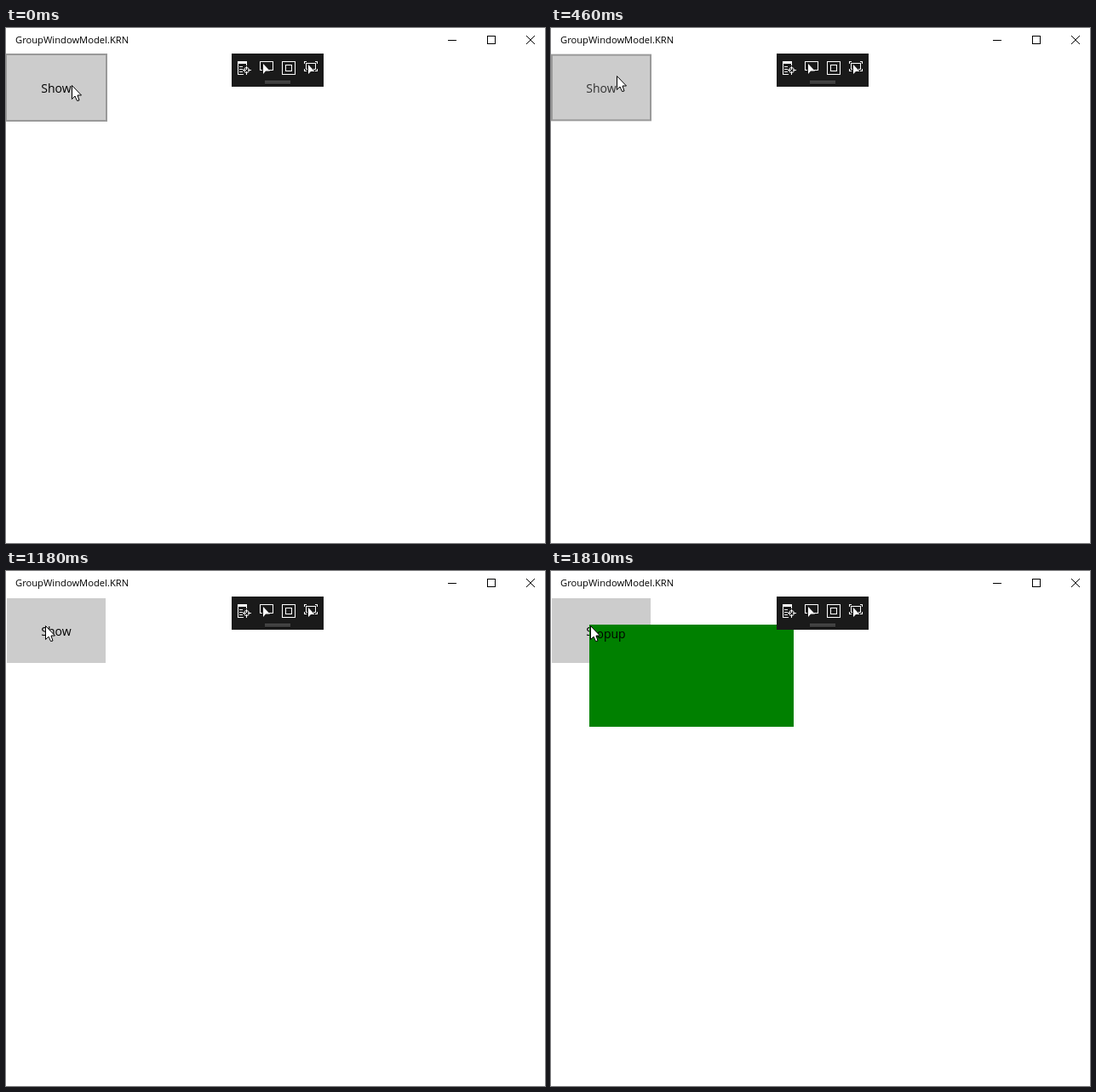
Animation, 633 px wide and 605 px high, one loop 1980 ms. Source, as an HTML page with a canvas:

```html
<!DOCTYPE html>
<html lang="en">
<head>
<meta charset="utf-8">
<title>Popup demo</title>
<style>
html, body { margin: 0; width: 100%; height: 100%; overflow: hidden; background: #fff; }
canvas { display: block; }
</style>
</head>
<body>
<canvas id="stage" width="633" height="605"></canvas>
<script>
const ctx = document.getElementById('stage').getContext('2d');
const LOOP = 1980;
const FONT = '"Open Sans", "Noto Sans", sans-serif';
const PRESSED = 0.978;

// Keys are [time, value]; values between keys are linear.
const cursorX = [[0, 77], [560, 77], [640, 71], [940, 46]];
const cursorY = [[0, 67], [20, 67], [320, 56], [560, 56], [640, 61], [940, 64]];
const scale = [
  [0, 1], [335, 1], [368, PRESSED], [440, PRESSED], [525, 1],
  [559, 1], [560, PRESSED], [645, PRESSED], [780, 1],
  [1380, 1], [1440, PRESSED], [1620, PRESSED], [1810, 1]
];

function at(keys, t) {
  for (let i = 1; i < keys.length; i++) {
    const [t0, a] = keys[i - 1], [t1, b] = keys[i];
    if (t < t1) return a + (b - a) * (t - t0) / (t1 - t0);
  }
  return keys[keys.length - 1][1];
}

const within = (t, from, to) => t >= from && t < to;

function rect(x, y, w, h, color) {
  ctx.fillStyle = color;
  ctx.fillRect(x, y, w, h);
}

function frame(x, y, w, h, color) {
  ctx.strokeStyle = color;
  ctx.lineWidth = 1;
  ctx.strokeRect(x + 0.5, y + 0.5, w - 1, h - 1);
}

function text(str, x, y, size, color = '#000', align = 'left') {
  ctx.font = `${size}px ${FONT}`;
  ctx.textAlign = align;
  ctx.fillStyle = color;
  ctx.fillText(str, x, y);
}

function poly(points, x, y, fill, stroke) {
  ctx.beginPath();
  points.forEach(([px, py]) => ctx.lineTo(x + px, y + py));
  ctx.closePath();
  ctx.fillStyle = fill;
  ctx.fill();
  if (stroke) {
    ctx.strokeStyle = stroke;
    ctx.lineWidth = 1;
    ctx.stroke();
  }
}

function line(x0, y0, x1, y1, color) {
  ctx.strokeStyle = color;
  ctx.lineWidth = 1;
  ctx.beginPath();
  ctx.moveTo(x0, y0);
  ctx.lineTo(x1, y1);
  ctx.stroke();
}

function titleBar() {
  text('GroupWindowModel.KRN', 11, 18, 11.2);
  rect(519, 14, 10, 1, '#000');
  frame(565, 9, 10, 10, '#000');
  line(611, 9, 621, 19, '#000');
  line(621, 9, 611, 19, '#000');
}

function button(t) {
  const s = at(scale, t);
  const hover = t < 560 || within(t, 1310, 1400);
  ctx.save();
  ctx.translate(59, 70);
  ctx.scale(s, s);
  if (hover) rect(-60, -40, 120, 80, '#999');
  rect(-58, -38, 116, 76, '#ccc');
  ctx.restore();
  text('Show', 59, 76, 14, s < 0.999 ? '#333' : '#000', 'center');
}

function popup(x, y) {
  rect(x, y, 240, 120, '#008000');
  text('Popup', x, y + 16, 14);
}

const pointer = [[0, 0], [0, 12], [3, 9], [5.5, 14], [8, 13], [5.5, 8.5], [9, 8.5]];

function toolbar() {
  const white = '#fff', dark = '#1a1a1a';
  rect(265, 30, 108, 39, dark);

  // List with crosshair
  rect(272, 39, 11, 3, white);
  rect(272, 42, 1, 13, white);
  rect(272, 54, 7, 1, white);
  rect(282, 42, 1, 2, white);
  for (const y of [45, 48, 51]) rect(274, y, 4, 1, white);
  ctx.strokeStyle = white;
  ctx.beginPath();
  ctx.arc(282.5, 49.5, 3, 0, 7);
  ctx.stroke();
  rect(278, 49, 4, 1, white);
  rect(284, 49, 4, 1, white);
  rect(282, 45, 1, 4, white);
  rect(282, 51, 1, 4, white);

  // Element picker
  frame(298, 39, 16, 11, white);
  rect(301, 43, 8, 11, dark);
  poly([[0, 0], [0, 12], [3, 8.5], [8, 8.5]], 302, 42, white);

  // Nested frames
  frame(324, 39, 16, 16, white);
  frame(328, 43, 8, 8, white);

  // Focus tracker
  frame(352, 41, 12, 8, white);
  for (const x of [350, 363]) {
    rect(x, 39, 3, 1, white);
    rect(x, 50, 3, 1, white);
  }
  for (const x of [350, 365]) {
    rect(x, 39, 1, 3, white);
    rect(x, 48, 1, 3, white);
  }
  rect(354, 44, 7, 10, dark);
  poly([[0, 0], [0, 11], [3, 8], [7.5, 8]], 355, 43, white);

  rect(304, 62, 30, 1, '#666');
  rect(304, 64, 30, 1, '#666');
}

function cursor(t) {
  const x = Math.round(at(cursorX, t)), y = Math.round(at(cursorY, t));
  const arrow = [
    [0, 0], [0, 16], [3.5, 12.5], [6, 18], [8.5, 17.5],
    [6.5, 11.5], [11, 11.5]
  ];
  poly(arrow, x + 0.5, y + 0.5, '#fff', '#000');
}

function draw(now) {
  const t = now % LOOP;
  rect(0, 0, 633, 605, '#fff');
  titleBar();
  button(t);
  if (within(t, 530, 1090)) popup(76, 55);
  if (t >= 1590) popup(45, 63);
  toolbar();
  cursor(t);
}

function tick() {
  draw(performance.now());
  requestAnimationFrame(tick);
}
tick();
</script>
</body>
</html>
```
